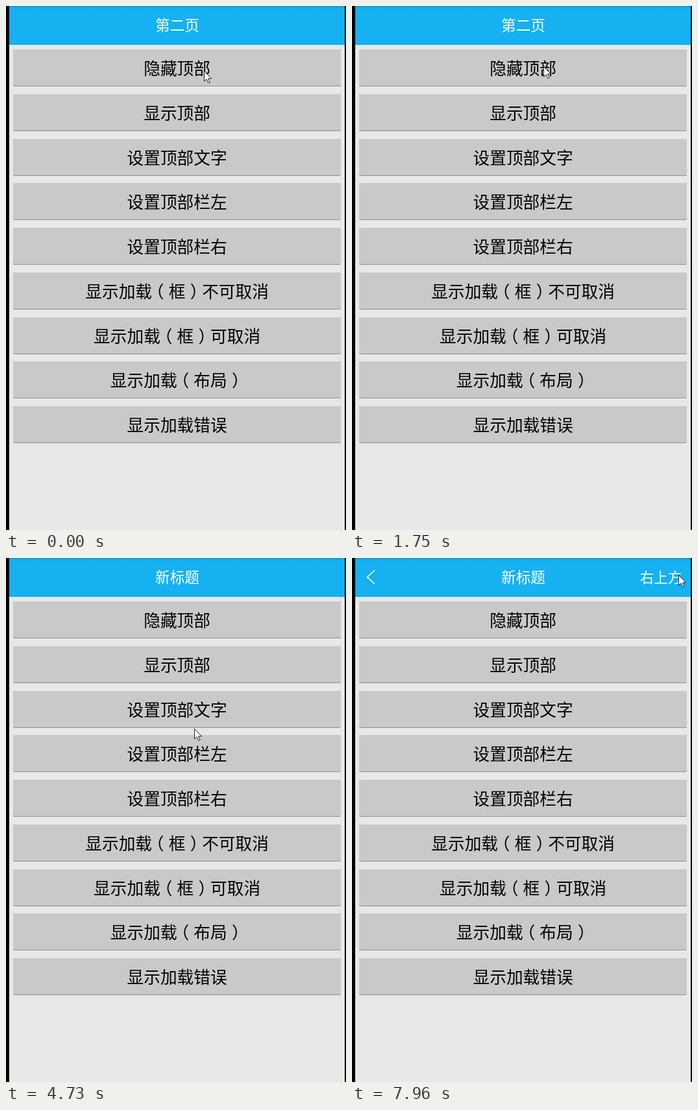
Write an HTML page that moves like this. It is 524x808 px and loops after 8 s.

```html
<!DOCTYPE html>
<html lang="zh-CN">
<head>
<meta charset="utf-8">
<title>第二页</title>
<style>
html, body { margin: 0; width: 100%; height: 100%; overflow: hidden; background: #000; }
svg { display: block; width: 524px; height: 808px; }
text { font-family: "Noto Sans CJK SC", "Noto Sans CJK", sans-serif; text-anchor: middle; }
</style>
</head>
<body>
<svg id="stage" viewBox="0 0 524 808" xmlns="http://www.w3.org/2000/svg">
  <defs>
    <linearGradient id="shade" x2="0" y2="1">
      <stop stop-opacity=".12"/>
      <stop offset="1" stop-opacity="0"/>
    </linearGradient>
  </defs>
  <rect width="524" height="808"/>
  <rect x="5" width="517" height="808" fill="#e8e8e8"/>
  <g id="list"></g>
  <g id="bar">
    <rect x="5" width="517" height="60" fill="#15b1f0"/>
    <path id="back" d="M35 19L23.5 29.5L35 40" fill="none" stroke="#fff" stroke-width="1.6"/>
  </g>
  <rect x="5" width="517" height="4" fill="url(#shade)"/>
  <path id="cursor" d="M.5 .5V16.2L4.1 12.8L6.8 18.6L9.2 17.5L6.6 11.9H11.6Z"
        fill="#fff" stroke="#1c1c30" stroke-width="1"/>
</svg>
<script>
const LOOP = 8000, STEP = 140, BAR = 63, PITCH = 68.75, CENTER = 263.6;
const labels = ['隐藏顶部', '显示顶部', '设置顶部文字', '设置顶部栏左', '设置顶部栏右',
  '显示加载（框）不可取消', '显示加载（框）可取消', '显示加载（布局）', '显示加载错误'];

// When each click takes effect
const HIDE = 240, SHOW = 1750, RENAME = 3750, LEFT = 5690, RIGHT = 7340;
// The first three clicks flash their row just before
const clicks = [HIDE, SHOW, RENAME];

const home = { x: 305, y: 100 };
const moves = [
  { from: 800, to: 1070, x: 281, y: 68 },
  { from: 1210, to: 1350, x: 295, y: 93 },
  { from: 2330, to: 2480, x: 295, y: 115 },
  { from: 2790, to: 3430, x: 293, y: 233 },
  { from: 4030, to: 4180, x: 259, y: 35 },
  { from: 4580, to: 4730, x: 290, y: 263 },
  { from: 4870, to: 5130, x: 318, y: 299 },
  { from: 5840, to: 6440, x: 29, y: 19 },
  { from: 6720, to: 7020, x: 274, y: 356 },
  { from: 7510, to: 7690, x: 447, y: 118 },
  { from: 7810, to: 7960, x: 503, y: 26 }
];

const $ = id => document.getElementById(id);
const within = (t, a, b) => t >= a && t < b;
const easeOut = k => 1 - (1 - k) ** 2;

function add(parent, tag, attrs) {
  const el = document.createElementNS('http://www.w3.org/2000/svg', tag);
  for (const k in attrs) el.setAttribute(k, attrs[k]);
  return parent.appendChild(el);
}

// One x per character; brackets sit in the middle of their cell
function label(parent, str, cx, cy, size, fill) {
  const nudge = { '（': -.28, '）': .28 };
  const xs = [...str].map((c, i) =>
    (cx + (i - (str.length - 1) / 2 + (nudge[c] || 0)) * size).toFixed(2));
  const el = add(parent, 'text', { x: xs.join(' '), y: cy + .38 * size, 'font-size': size, fill });
  el.textContent = str;
  return el;
}

const rows = labels.map((str, i) => {
  const g = add($('list'), 'g', { transform: `translate(0 ${Math.round(67 + i * PITCH)})` });
  const glow = add(g, 'rect', { x: 6, y: -6, width: 515, height: 68, rx: 5, fill: '#a2d5e9' });
  const edge = add(g, 'rect', { x: 11, y: 0, width: 505, height: 57, rx: 2 });
  const face = add(g, 'rect', { x: 11, y: 0, width: 505, height: 56, rx: 2 });
  label(g, str, CENTER, 29, 25.7, '#000');
  return { glow, edge, face };
});

const bar = $('bar');
const title = label(bar, '第二页', 264, 29, 22.7, '#fff');
const action = label(bar, '右上方', 476, 29.5, 21.5, '#fff');

function show(el, on) {
  el.setAttribute('visibility', on ? 'inherit' : 'hidden');
}

// The pointer advances in discrete steps, slowing into each stop
function pointerAt(t) {
  let pos = home;
  for (const { from, to, x, y } of moves) {
    if (t < from) break;
    const gaps = Math.round((to - from) / STEP);
    const done = Math.floor((t - from) / (to - from) * gaps + 1e-6) + 1;
    const k = easeOut(Math.min(1, done / (gaps + 1)));
    pos = { x: pos.x + (x - pos.x) * k, y: pos.y + (y - pos.y) * k };
  }
  return pos;
}

function draw(t) {
  const hidden = within(t, HIDE, SHOW);
  show(bar, !hidden);
  $('list').setAttribute('transform', `translate(0 ${hidden ? -BAR : 0})`);

  rows.forEach((row, i) => {
    const on = i < clicks.length && within(t, clicks[i] - STEP + 10, clicks[i]);
    show(row.glow, on);
    row.edge.setAttribute('fill', on ? '#3193bd' : '#8e8e8e');
    row.face.setAttribute('fill', on ? '#49b9e5' : '#c9c9c9');
  });

  title.textContent = t < RENAME ? '第二页' : '新标题';
  show($('back'), t >= LEFT);
  show(action, t >= RIGHT);

  const { x, y } = pointerAt(t);
  $('cursor').setAttribute('transform', `translate(${Math.round(x)} ${Math.round(y)})`);
}

const start = performance.now();
function tick() {
  draw((performance.now() - start) % LOOP);
  requestAnimationFrame(tick);
}
tick();
</script>
</body>
</html>
```
